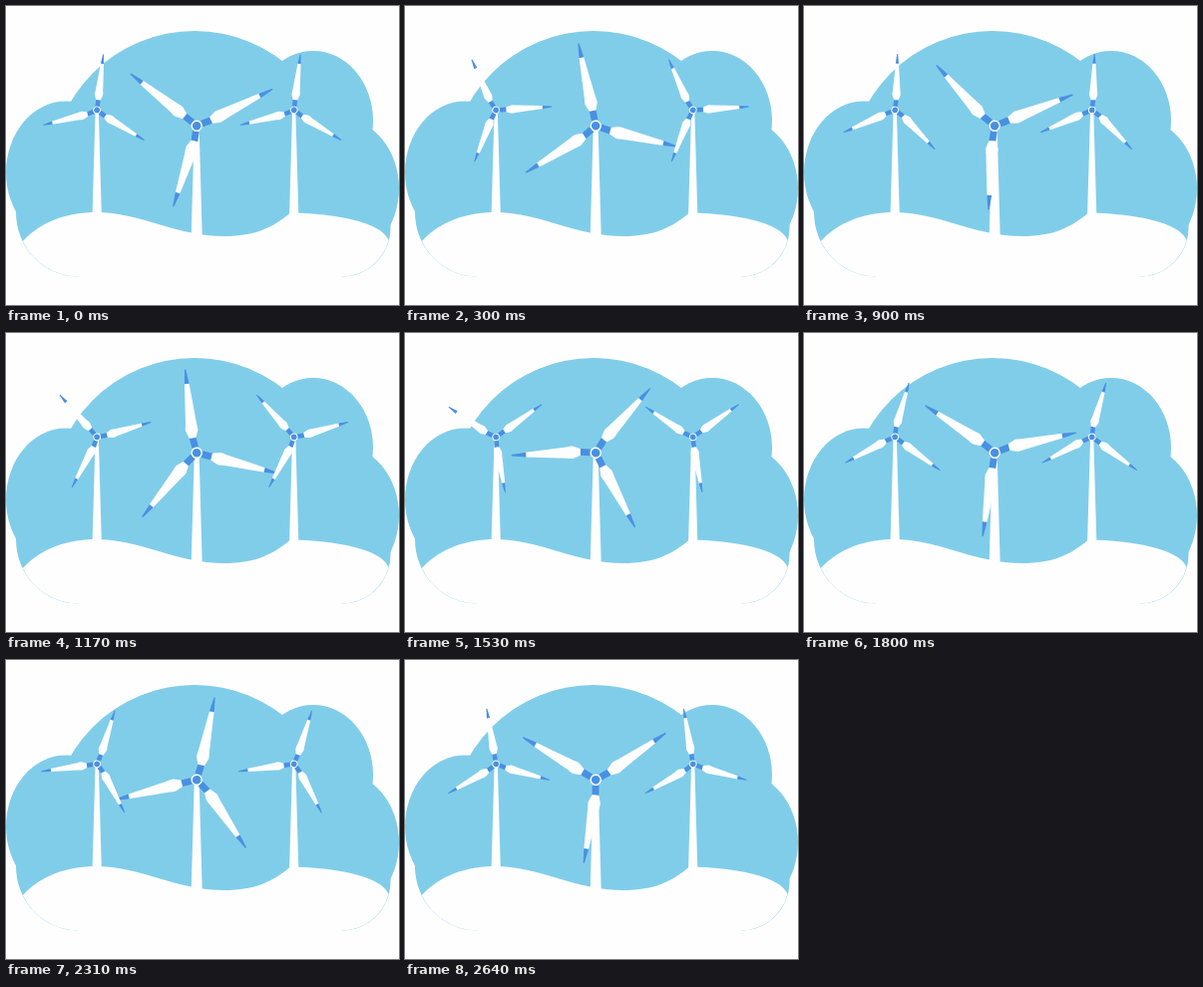
Animation, 394 px wide and 300 px high, one loop 2.67 s. Source, as an HTML page:

```html
<!DOCTYPE html>
<html lang="en">
<head>
<meta charset="utf-8">
<title>Wind turbines</title>
<style>
  html, body { margin: 0; width: 100%; height: 100%; overflow: hidden; background: #fefefe; }
  svg { display: block; width: 100vw; height: 100vh; }
  .sky { fill: #80cdea; }
  .white { fill: #fefefe; }
  .blue { fill: #4a90e2; }
</style>
</head>
<body>
<svg viewBox="0 0 394 300" xmlns="http://www.w3.org/2000/svg">
  <g class="sky">
    <circle cx="189" cy="169" r="144"/>
    <ellipse cx="308" cy="115" rx="60" ry="70"/>
    <ellipse cx="60" cy="167" rx="60" ry="71.5"/>
    <ellipse cx="334" cy="183" rx="60" ry="71"/>
    <path d="M10 207A62 64.5 0 0 0 72 271.5H337A48.5 49.5 0 0 0 385.5 222V200H10Z"/>
  </g>
  <path class="white" d="M16.8 236C35 216 62 207 90 207C135 207 170 231 219 231C250 231 268 222 285 207.5C330 208 377 217 383.6 235A48.5 49.5 0 0 1 337 271.5V320H72V271.5A62 64.5 0 0 1 16.8 236Z"/>
  <g id="turbines"></g>
</svg>
<script>
  const STEP = 30, STEPS = 89;
  const BENDS = [-5.5, 9.2, -0.6];   // tilt of each blade against its root

  // x, y: hub; base: foot of the tower; rate: degrees per step
  const turbines = [
    { x: 191.2, y: 120.2, base: 232, top: 2.4, foot: 5.5, scale: 1, start: 68.7, rate: 4 },
    { x: 91.2, y: 104.4, base: 209, top: 1.6, foot: 4.6, scale: 0.667, start: 127, rate: 8 },
    { x: 288.7, y: 104.4, base: 209, top: 1.6, foot: 4.6, scale: 0.667, start: 127, rate: 8 }
  ];

  const blade = (bend, i) => `
    <g transform="rotate(${i * 120})">
      <rect class="blue" x="-3.4" y="-15.6" width="6.8" height="10"/>
      <g transform="rotate(${bend} 0 -16)">
        <path class="white" d="M-3.4 -15.4L-6.2 -23Q-6.3 -26 -5.6 -29L-2.3 -70.5H2.3L5.6 -29Q6.3 -26 6.2 -23L3.4 -15.4Z"/>
        <path class="blue" d="M-2.4 -70L-0.7 -84Q0 -85.4 0.7 -84L2.4 -70Z"/>
      </g>
    </g>`;

  const tower = t => `<path class="white" d="M${t.x - t.top} ${t.y}H${t.x + t.top}L${t.x + t.foot} ${t.base}H${t.x - t.foot}Z"/>`;

  const rotor = t => `
    <g class="rotor">
      ${BENDS.map(blade).join("")}
      <circle class="white" r="5.6"/>
      <circle class="blue" r="4.3"/>
    </g>`;

  document.getElementById("turbines").innerHTML = turbines.map(t => tower(t) + rotor(t)).join("");
  const rotors = document.querySelectorAll(".rotor");

  function draw(ms) {
    const step = Math.floor(ms / STEP) % STEPS;
    turbines.forEach((t, i) => {
      const angle = t.start + t.rate * step;
      rotors[i].setAttribute("transform", `translate(${t.x} ${t.y}) rotate(${angle}) scale(${t.scale})`);
    });
  }

  const begin = performance.now();
  function tick() {
    draw(performance.now() - begin);
    requestAnimationFrame(tick);
  }
  tick();
</script>
</body>
</html>
```
